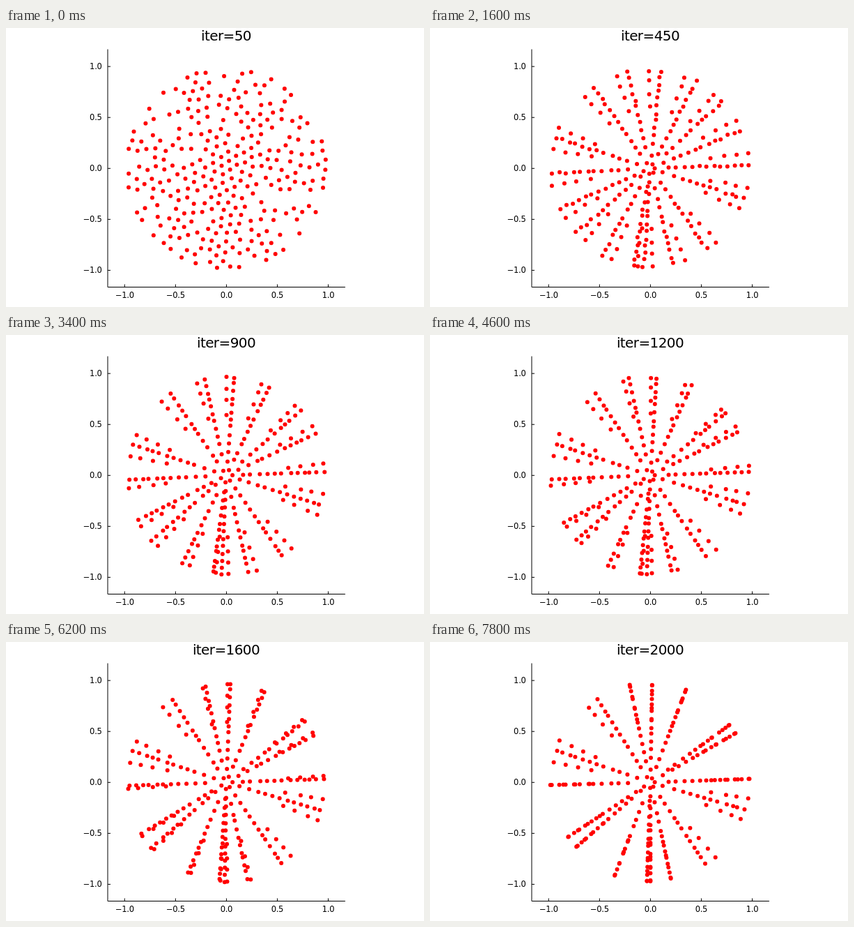
An HTML page for the animation above (8 s loop, 600 px wide and 400 px high).

```html
<!DOCTYPE html>
<html lang="en">
<head>
<meta charset="utf-8">
<title>Scatter iterations</title>
<style>
  html, body { margin: 0; width: 100%; height: 100%; overflow: hidden; background: #fff; }
  svg { display: block; width: 600px; height: 400px; }
  text { font-family: "DejaVu Sans", sans-serif; font-size: 11.5px; letter-spacing: -0.3px; fill: #000; }
  #title { font-size: 20px; letter-spacing: -0.6px; text-anchor: middle; }
  .x { text-anchor: middle; }
  .y { text-anchor: end; }
  #axes { fill: none; stroke: #000; stroke-width: 1; }
  #dots { fill: #f00; }
</style>
</head>
<body>
<svg viewBox="0 0 600 400">
  <path id="axes"/>
  <g id="labels"></g>
  <g id="dots"></g>
  <text id="title" x="316" y="18.3"></text>
</svg>
<script>
const CX = 316.4, CY = 201.3, UNIT = 146.1, RIM = 141;
const STEP_MS = 200, STEPS = 40, FORMED = 8;
const WING = 7, WIDE_GAP = 30, SPACING = 13;

// Angle of each spoke in degrees, once formed and at the end
const SPOKES = [
  [2, 2], [23, 30], [43, 36], [62, 69], [84, 89], [103, 102], [125, 122.5], [162, 161.3], [183, 181.5],
  [204, 213.5], [221, 221], [241, 249], [260, 268], [266, 270], [283, 282], [305, 304], [342, 344]
];

const $ = id => document.getElementById(id);
const mix = (a, b, t) => a + (b - a) * t;

function add(parent, tag, attrs, text = "") {
  const node = document.createElementNS("http://www.w3.org/2000/svg", tag);
  for (const key in attrs) node.setAttribute(key, attrs[key]);
  node.textContent = text;
  return parent.appendChild(node);
}

let seed = 17;
function random() {
  seed = (seed * 16807) % 2147483647;
  return seed / 2147483647;
}
const spread = size => (random() * 2 - 1) * size;

function polar(r, degrees) {
  const a = degrees * Math.PI / 180;
  return [r * Math.cos(a), r * Math.sin(a)];
}

function drawAxes() {
  let path = "M146 30.5V371.5H487";
  for (let v = -1; v <= 1; v += 0.5) {
    const x = CX + v * UNIT, y = CY - v * UNIT;
    const label = v.toFixed(1).replace("-", "\u2212");
    path += `M${x} 371.5v-4M146 ${y}h4`;
    add($("labels"), "text", { class: "x", x, y: 387 }, label);
    add($("labels"), "text", { class: "y", x: 137.5, y: y + 4 }, label);
  }
  $("axes").setAttribute("d", path);
}

function makeRow(count, inner, from, to) {
  return Array.from({ length: count }, (_, i) => ({
    radius: mix(inner, RIM, (i / (count - 1)) ** 0.88) + spread(1.5),
    from, to,
    phase: random() * 2 * Math.PI,
    node: add($("dots"), "circle", { r: 3 })
  }));
}

// A full row per spoke, plus short outer wings that fold in unless a wide gap keeps them open
function makeSpoke([from, to], i) {
  const n = SPOKES.length;
  const gapTo = j => (Math.abs(SPOKES[(j + n) % n][0] - from) + 360) % 360;
  const after = (SPOKES[(i + 1) % n][0] - from + 360) % 360;
  const before = (from - SPOKES[(i + n - 1) % n][0] + 360) % 360;
  const offset = Math.min(WING, after / 3);
  const open = Math.max(before, after) > WIDE_GAP;
  const inner = 9 + 11 * (i % 3);
  const dots = makeRow(Math.round((RIM - inner) / 10), inner, from, to);
  dots.push(...makeRow(4, 88, from + offset, open ? to + offset : to));
  if (before > WIDE_GAP) dots.push(...makeRow(4, 88, from - WING + 1, to - WING + 1));
  return dots;
}

function spokePoint(dot, step) {
  const turn = Math.max(0, (step - FORMED) / (STEPS - 1 - FORMED));
  const r = dot.radius + 1.3 * Math.sin(step * 0.4 + dot.phase);
  return polar(r, mix(dot.from, dot.to, turn));
}

// Loosens the spokes into an evenly scattered disc for the first step
function scatter(dots) {
  const points = dots.map(dot => polar(dot.radius, dot.from + spread(15)));
  for (let pass = 0; pass < 40; pass++) {
    points.forEach((p, i) => {
      for (const q of points.slice(0, i)) {
        const dx = p[0] - q[0], dy = p[1] - q[1], d = Math.hypot(dx, dy) || 1;
        if (d > SPACING) continue;
        const push = (SPACING - d) / d * 0.2;
        p[0] += dx * push; p[1] += dy * push;
        q[0] -= dx * push; q[1] -= dy * push;
      }
    });
    for (const p of points) {
      const over = Math.hypot(...p) / (RIM + 2);
      if (over > 1) { p[0] /= over; p[1] /= over; }
    }
  }
  dots.forEach((dot, i) => dot.start = points[i]);
}

function draw(step) {
  const loose = Math.exp(-step / 2.6);
  for (const dot of dots) {
    const [x, y] = spokePoint(dot, step);
    dot.node.setAttribute("cx", CX + mix(x, dot.start[0], loose));
    dot.node.setAttribute("cy", CY - mix(y, dot.start[1], loose));
  }
  $("title").textContent = "iter=" + (step + 1) * 50;
}

drawAxes();
const dots = SPOKES.flatMap(makeSpoke);
scatter(dots);

let shown = -1;
function tick() {
  const step = Math.floor(performance.now() / STEP_MS) % STEPS;
  if (step !== shown) draw(shown = step);
  requestAnimationFrame(tick);
}
tick();
</script>
</body>
</html>
```
